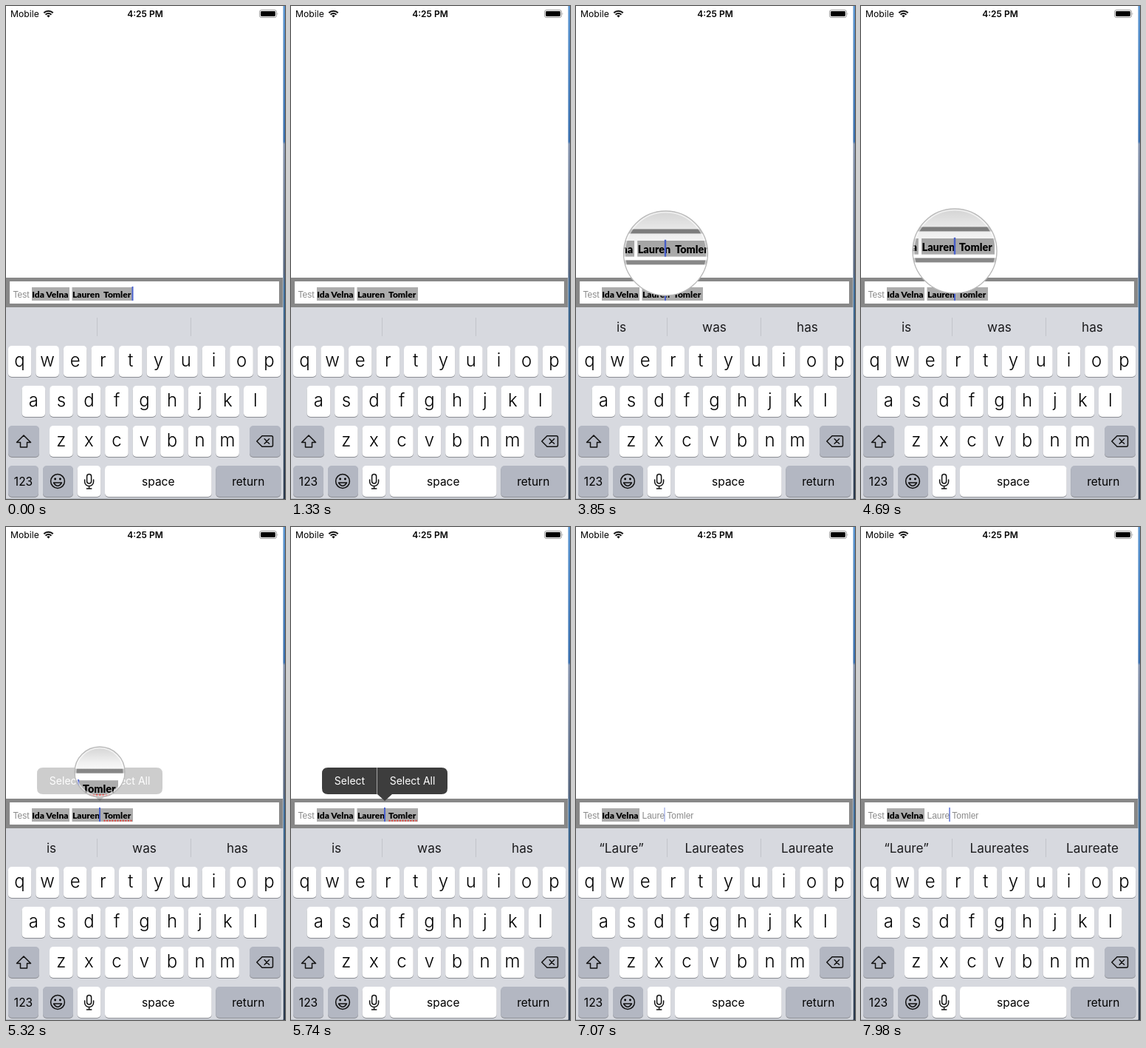
An HTML page that plays this animation: 378x666 px, repeating every 8 s.

```html
<!DOCTYPE html>
<html lang="en">
<head>
<meta charset="utf-8">
<title>Tagged text field</title>
<style>
  html, body { margin: 0; width: 100%; height: 100%; overflow: hidden; background: #fff; }
  svg { display: block; width: 378px; height: 666px; }
  text { font-family: Inter, Roboto, sans-serif; fill: #000; white-space: pre; }
  .mid { text-anchor: middle; }
  .letter { font-size: 24px; font-weight: 300; }
  .word { font-size: 15.5px; }
  .hint { font-size: 17.2px; fill: #1c1c1e; }
  .plain { font: 12px "Liberation Sans", Arial, sans-serif; fill: #8a8a8a; }
  .tag { font: 900 12px Lato, "Open Sans", sans-serif; }
  .menu text { font-size: 14px; fill: #fff; }
  .line { fill: none; stroke: #111; stroke-width: 1.5; stroke-linejoin: round; stroke-linecap: round; }
</style>
</head>
<body>
<svg viewBox="0 0 378 666">
  <defs>
    <linearGradient id="wall" x1="0" y1="0" x2="0" y2="1">
      <stop offset="0" stop-color="#5b96d2"/>
      <stop offset=".275" stop-color="#396fae"/>
      <stop offset=".28" stop-color="#8796b0"/>
      <stop offset=".54" stop-color="#56667f"/>
      <stop offset=".57" stop-color="#3c6b98"/>
      <stop offset=".8" stop-color="#3a5570"/>
      <stop offset="1" stop-color="#29384c"/>
    </linearGradient>
    <linearGradient id="glass" x1="0" y1="0" x2="0" y2="1">
      <stop offset="0" stop-color="#000" stop-opacity=".17"/>
      <stop offset=".3" stop-color="#000" stop-opacity=".06"/>
      <stop offset=".55" stop-color="#000" stop-opacity="0"/>
    </linearGradient>
    <clipPath id="lensClip"><circle id="lensHole"/></clipPath>
  </defs>

  <rect width="378" height="666" fill="url(#wall)"/>
  <rect width="375.5" height="665.5" fill="#fff"/>

  <g id="status">
    <text x="6" y="14.5" font-size="12.2">Mobile</text>
    <g class="line" style="stroke-width:2;stroke-linecap:butt">
      <path d="M51.3 9.2A9 9 0 0 1 63.7 9.2M53.6 11.7A5.6 5.6 0 0 1 61.4 11.7"/>
    </g>
    <path d="M55.4 13.3A3 3 0 0 1 59.6 13.3L57.5 15.6Z"/>
    <text class="mid" x="188.5" y="14.5" font-size="12" font-weight="600">4:25 PM</text>
    <rect x="343.5" y="5.5" width="23" height="10" rx="2.6" fill="none" stroke="#999"/>
    <rect x="345" y="7" width="20" height="7" rx="1.4"/>
    <path d="M367.6 8.8Q369.2 10.5 367.6 12.2Z" fill="#999"/>
  </g>

  <rect y="407" width="375.5" height="258.5" fill="#d7d9df"/>
  <path d="M123.5 421V446M250.5 421V446" stroke="#c2c4ca"/>
  <g id="hints"></g>
  <g id="keys"></g>

  <g class="line">
    <path d="M24 580L33.5 589.5H28.5V596H19.5V589.5H14.5Z"/>
    <circle cx="70" cy="642" r="9.4"/>
    <path d="M64.5 644Q70 652.5 75.5 644Z"/>
    <rect x="109.6" y="632.5" width="6" height="12.5" rx="3"/>
    <path d="M106.6 640V642.5A6 6 0 0 0 118.6 642.5V640M112.6 648.5V652M109.4 652H115.8"/>
  </g>
  <circle cx="66.6" cy="639" r="1.4"/>
  <circle cx="73.4" cy="639" r="1.4"/>
  <path id="erase" class="line" d="M339.8 588L347 580.7H359.5Q361.5 580.7 361.5 582.7V593.3Q361.5 595.3 359.5 595.3H347Z"/>
  <path id="cross" class="line" d="M350.2 584.8L356.6 591.2M356.6 584.8L350.2 591.2"/>

  <g id="field">
    <rect x="2.5" y="369.5" width="370" height="35" fill="#fff" stroke="#888" stroke-width="5"/>
    <text class="plain" x="9.5" y="394">Test</text>
    <rect x="35" y="380" width="51" height="18" fill="#acacac"/>
    <text class="tag" x="35.3" y="394.3">Ida Velna</text>
    <g id="tagged">
      <rect x="89.5" y="380" width="82.5" height="18" fill="#acacac"/>
      <text class="tag" x="90" y="394.3">Lauren</text>
      <text class="tag" x="132" y="394.3">Tomler</text>
    </g>
    <text id="untagged" class="plain" x="89.5" y="394">Laure Tomler</text>
    <path id="typo" d="M132.5 396.7H171.5" stroke="#e0433c" stroke-width="2" stroke-dasharray="2 1.6"/>
    <rect id="caret" y="379" width="2" height="19" fill="#4a62d0"/>
  </g>

  <g id="menu" class="menu">
    <path d="M50 325H204Q212 325 212 333V353Q212 361 204 361H137L127 370L117 361H50Q42 361 42 353V333Q42 325 50 325Z" fill="#3d3d3d"/>
    <path d="M116.5 325V361" stroke="#a5a5a5"/>
    <text class="mid" x="79.5" y="348">Select</text>
    <text class="mid" x="164.5" y="348">Select All</text>
  </g>

  <g id="lens">
    <g clip-path="url(#lensClip)">
      <rect width="378" height="666" fill="#fff"/>
      <use id="zoom" href="#field"/>
    </g>
    <circle id="shade" fill="url(#glass)" stroke="#b9b9b9" stroke-width="1.4"/>
    <circle id="rim" fill="none" stroke="#fff" stroke-opacity=".6" stroke-width="1.6"/>
  </g>
</svg>

<script>
const LOOP = 8000, TICK = 70;
const $ = id => document.getElementById(id);

function add(parent, name, attrs, label) {
  const node = document.createElementNS('http://www.w3.org/2000/svg', name);
  for (const k in attrs) node.setAttribute(k, attrs[k]);
  if (label) node.textContent = label;
  return parent.appendChild(node);
}

function set(id, attrs) {
  for (const k in attrs) $(id).setAttribute(k, attrs[k]);
}

function addKey(x, y, w, label, dark, cls = 'word') {
  const box = { x, width: w, height: 42, rx: 5 };
  add($('keys'), 'rect', { ...box, y: y + 1, fill: '#8b8d93' });
  const face = add($('keys'), 'rect', { ...box, y, fill: dark ? '#b3b7c2' : '#fff' });
  const base = cls === 'letter' ? 28 : 26.5;
  if (label) add($('keys'), 'text', { x: x + w / 2, y: y + base, class: 'mid ' + cls }, label);
  return face;
}

[['qwertyuiop', 2.8, 459], ['asdfghjkl', 21.6, 513], ['zxcvbnm', 59, 567]].forEach(([row, x, y]) =>
  [...row].forEach((c, i) => addKey(x + i * 37.55, y, 31.6, c, false, 'letter')));
addKey(3, 567, 42, '', true);
const eraseKey = addKey(330, 567, 42, '', true);
addKey(3, 621, 41, '123', true);
addKey(50, 621, 41, '', true);
addKey(96.7, 621, 31.6, '');
addKey(134, 621, 144.6, 'space');
addKey(284.3, 621, 88, 'return', true);

const hintNodes = [61.5, 187.5, 313.5].map(x => add($('hints'), 'text', { x, y: 439.5, class: 'mid hint' }));

// Tables of [time, value]
const caretX = [[0, 171.5], [2310, 132], [3430, 121], [4270, 109], [4340, 114], [4410, 121], [4480, 127], [6720, 120]];
const hints = [[0, []], [2310, ['is', 'was', 'has']], [6720, ['“Lauren”']], [7000, ['“Laure”', 'Laureates', 'Laureate']]];
const caretAlpha = [[0, 1], [210, 0], [420, 0], [630, 1], [1000, 1], [1210, 0], [1420, 0], [1630, 1],
  [2000, 1], [2210, 0], [2300, 0], [2310, 1], [2800, 1], [3010, 0], [3150, 0], [3360, 1],
  [5810, 1], [6020, 0], [6230, 0], [6440, 1], [6930, 1], [7140, 0], [7350, 0], [7560, 1], [7910, 1], [8120, 0]];
const lensX = [[0, 121.5], [4130, 121.5], [4270, 107], [4480, 127]];
const lensY = [[3360, 380], [3640, 334], [4130, 334], [4270, 331]];
const lensR = [[3360, 0], [3640, 57], [5110, 57], [5320, 34], [5460, 0]];
const menuAlpha = [[5250, 0], [5320, .25], [5460, 1], [6860, 1], [7070, 0]];

function held(table, t) {
  let value = table[0][1];
  for (const [at, v] of table) if (t >= at) value = v;
  return value;
}

function eased(table, t) {
  const i = table.findIndex(([at]) => at > t);
  if (i === 0) return table[0][1];
  if (i < 0) return table[table.length - 1][1];
  const [t0, a] = table[i - 1], [t1, b] = table[i];
  return a + (b - a) * (t - t0) / (t1 - t0);
}

const show = (id, on) => set(id, { display: on ? 'inline' : 'none' });

function drawLens(t) {
  const r = eased(lensR, t), cx = eased(lensX, t), cy = eased(lensY, t);
  show('lens', r > 0);
  if (r <= 0) return;
  for (const id of ['lensHole', 'shade']) set(id, { cx, cy, r });
  set('rim', { cx, cy, r: Math.max(0, r - 1.6) });
  // The picture slides out of the shrinking lens
  const slip = t > 5000 ? 1 - r / 57 : 0;
  const focus = held(caretX, t), zoom = 1.2;
  const x = focus * (1 - zoom) - 72 * slip;
  const y = cy - 5 - 390 * zoom + 70 * slip;
  set('zoom', { transform: `translate(${x} ${y}) scale(${zoom})` });
}

function draw(t) {
  const erased = t >= 6720, pressed = erased && t < 6930;
  set('caret', { x: held(caretX, t) - 1, opacity: eased(caretAlpha, t) });
  set('menu', { opacity: eased(menuAlpha, t) });
  show('tagged', !erased);
  show('untagged', erased);
  show('typo', t >= 5180 && !erased);
  const words = held(hints, t);
  hintNodes.forEach((node, i) => node.textContent = words[i] || '');
  eraseKey.setAttribute('fill', pressed ? '#fff' : '#b3b7c2');
  $('erase').style.fill = pressed ? '#000' : 'none';
  $('cross').style.stroke = pressed ? '#fff' : '#111';
  drawLens(t);
}

const start = performance.now();
function frame() {
  const t = (performance.now() - start) % LOOP;
  draw(Math.floor(t / TICK) * TICK);
  requestAnimationFrame(frame);
}
frame();
</script>
</body>
</html>
```
